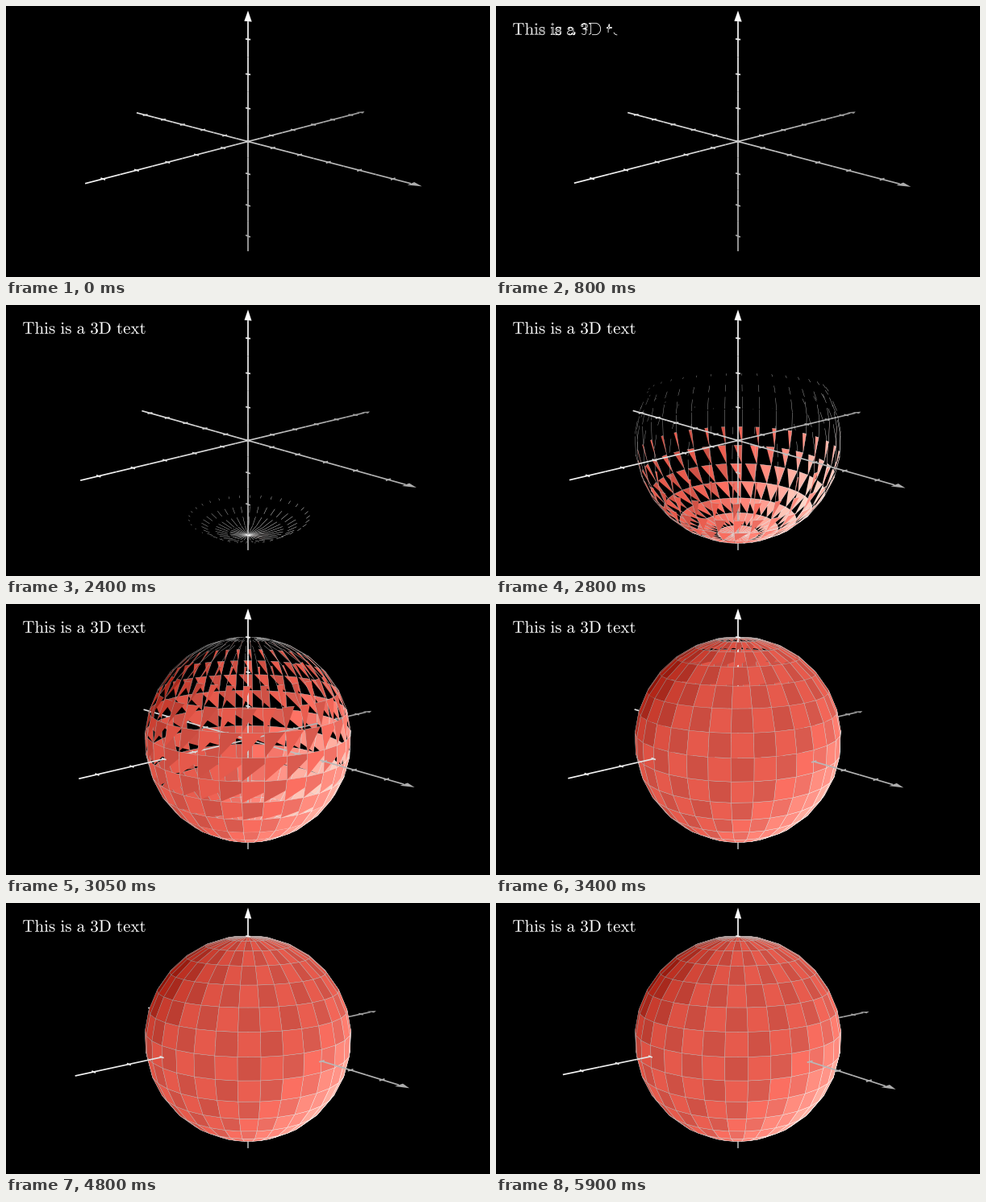
Recreate the animation shown at these times as a matplotlib script. Size 600x337 px, loop 6000 ms.

```python
import math

import matplotlib.pyplot as plt
import numpy as np
from matplotlib.animation import FuncAnimation
from matplotlib.collections import PolyCollection
from matplotlib.patches import PathPatch
from matplotlib.path import Path
from matplotlib.textpath import TextPath

W, H, DPI = 600, 337, 100
PX = 72 / DPI                      # points per pixel
UNIT = 42.17                       # pixels per scene unit
FOCAL = 20
PHI = math.radians(75)
THETA0 = math.radians(-45)
SPIN = 0.02                        # camera turn, radians per second
FPS = 15
SPIN_START = 6
WRITE_END, BUILD_START, BUILD_END = 30, 30, 60

RADIUS, ROWS, COLS = 3, 15, 32
CHECKER = np.array([[0xE6, 0x5A, 0x4C], [0xCF, 0x50, 0x44]]) / 255
GRID = np.full(3, 0xBB / 255)
LIGHT = np.array([-7, -9, 10])
FACE_OVERLAP = 2.0                 # build length in units of one face's drawing time
LETTER_LAG = 0.1

plt.rcParams["mathtext.fontset"] = "cm"


def smooth(t):
    def sigmoid(x):
        return 1 / (1 + math.exp(-x))
    low = sigmoid(-5)
    return min(max((sigmoid(10 * (t - 0.5)) - low) / (1 - 2 * low), 0), 1)


def double_smooth(t):
    return smooth(2 * t) / 2 if t < 0.5 else 0.5 + smooth(2 * t - 1) / 2


def soft_step(t):
    return t + 0.7 * (t * t * (3 - 2 * t) - t)


def project(points, theta):
    """Return screen positions and depth towards the camera."""
    x, y, z = np.moveaxis(np.asarray(points, float), -1, 0)
    side = -x * math.sin(theta) + y * math.cos(theta)
    back = -x * math.cos(theta) - y * math.sin(theta)
    up = back * math.cos(PHI) + z * math.sin(PHI)
    depth = -back * math.sin(PHI) + z * math.cos(PHI)
    scale = UNIT * FOCAL / (FOCAL - depth)
    xy = np.stack([W / 2 + side * scale, H / 2 - up * scale], axis=-1)
    return xy, depth


def cut(points, part):
    """First part (0 to 1) of a polyline, measured in vertices."""
    if part >= 1:
        return points
    pos = part * (len(points) - 1)
    n = int(pos)
    end = points[n] + (pos - n) * (points[n + 1] - points[n])
    return np.vstack([points[:n + 1], end])


def make_sphere():
    def at(u, v):
        return (RADIUS * math.cos(u) * math.cos(v),
                RADIUS * math.cos(u) * math.sin(v),
                RADIUS * math.sin(u))
    lat = np.linspace(-math.pi / 2, math.pi / 2, ROWS + 1)
    lon = np.linspace(0, 2 * math.pi, COLS + 1)
    faces, fills, edges = [], [], []
    for i in range(ROWS):
        for j in range(COLS):
            a, b, c, d = lat[i], lat[i + 1], lon[j], lon[j + 1]
            face = np.array([at(a, c), at(b, c), at(b, d), at(a, d), at(a, c)])
            middle = np.array(at((a + b) / 2, (c + d) / 2))
            sun = LIGHT - middle
            lit = -middle @ sun / RADIUS / np.linalg.norm(sun)
            glow = 0.5 * lit ** 3 * (1 if lit > 0 else 0.5)
            faces.append(face)
            fills.append(np.clip(CHECKER[(i + j) % 2] + glow, 0, 1))
            edges.append(np.clip(GRID + glow, 0, 1))
    return np.array(faces), fills, edges


def make_axes():
    """Line pieces, ticks and tips as (points, grey, is outside the sphere)."""
    ex, ey, ez = np.eye(3)
    lines, tips = [], []
    for way, side, end, first, last in ((ex, ey, 5.5, 0.88, 0.68),
                                        (ey, ex, 5.5, 0.97, 0.60),
                                        (ez, ex, 3.5, 0.66, 1.00)):
        def grey(s):
            return first + (last - first) * (s + end) / (2 * end)
        for s in np.arange(-end, end, 0.5):
            mid = s + 0.25
            lines.append(((s * way, (s + 0.5) * way), grey(mid), abs(mid) > RADIUS))
        for s in range(-int(end), int(end) + 1):
            mark = (s * way - 0.1 * side, s * way + 0.1 * side)
            lines.append((mark, grey(s), abs(s) >= RADIUS))
        base = end * way
        tips.append(((base - 0.15 * side, (end + 0.3) * way, base + 0.15 * side),
                     last, True))
    return lines, tips


def make_letters():
    """Outlines of the caption, one list of closed polygons per letter."""
    text = TextPath((0, 0), r"$\mathrm{This\ is\ a\ 3D\ text}$", size=210)
    polys = [p / 10 for p in Path(text.vertices, text.codes).to_polygons()]
    polys.sort(key=lambda p: p[:, 0].min())
    corner = np.array([polys[0][:, 0].min(), max(p[:, 1].max() for p in polys)])
    letters, right = [], -1e9
    for p in polys:
        p = (p - corner) * (1, -1) + 21.1
        if (p[:, 0].min() + p[:, 0].max()) / 2 < right:
            letters[-1].append(p)
        else:
            letters.append([p])
            right = -1e9
        right = max(right, p[:, 0].max())
    return letters


def outline(polys, part):
    left = part * sum(len(p) for p in polys)
    pieces = []
    for p in polys:
        if left <= 0:
            break
        pieces.append(Path(cut(p, min(left / len(p), 1))))
        left -= len(p)
    return Path.make_compound_path(*pieces)


faces, fills, edges = make_sphere()
lines, tips = make_axes()
letters = make_letters()

fig = plt.figure(figsize=(W / DPI, H / DPI), dpi=DPI, facecolor="black")
ax = fig.add_axes([0, 0, 1, 1])
ax.set_xlim(0, W)
ax.set_ylim(H, 0)
ax.axis("off")

scene = PolyCollection([], closed=False)
scene.set_snap(False)
ax.add_collection(scene, autolim=False)
glyphs = [ax.add_patch(PathPatch(outline(p, 1), snap=False)) for p in letters]


def draw_scene(step):
    theta = THETA0 + SPIN * max(0, step - SPIN_START) / FPS
    items = []                     # depth, points, fill, edge, width
    for parts, width in ((lines, 1.7), (tips, 0)):
        xy, depth = project([p[0] for p in parts], theta)
        for (_, grey, outside), pts, z in zip(parts, xy, depth.mean(axis=1)):
            rgba = (grey, grey, grey, 1)
            fill = (0, 0, 0, 0) if width else rgba
            items.append((z * 10 if outside else z, pts, fill, rgba, width))

    t = min(max((step - BUILD_START) / (BUILD_END - BUILD_START), 0), 1)
    if t > 0:
        reach = soft_step(t) * FACE_OVERLAP
        xy, depth = project(faces, theta)
        depth = depth[:, :4].mean(axis=1)
        delay = np.linspace(0, FACE_OVERLAP - 1, len(faces))
        for k in range(len(faces)):
            part = reach - delay[k]
            if part > 0:
                items.append((depth[k], cut(xy[k], part), (*fills[k], 1),
                              (*edges[k], 1), 0.4))

    items.sort(key=lambda item: item[0])
    _, verts, face, edge, width = zip(*items)
    scene.set_verts(verts, closed=False)
    scene.set_facecolor(face)
    scene.set_edgecolor(edge)
    scene.set_linewidth([w * PX for w in width])


def draw_text(step):
    total = 1 + LETTER_LAG * (len(letters) - 1)
    reach = double_smooth(min(step / WRITE_END, 1)) * total
    for k, (glyph, polys) in enumerate(zip(glyphs, letters)):
        part = min(max(reach - k * LETTER_LAG, 0), 1)
        glyph.set_visible(part > 0)
        if part == 0:
            continue
        fill = max(0, 2 * part - 1)
        glyph.set_path(outline(polys, min(2 * part, 1)))
        glyph.set_facecolor((1, 1, 1, fill))
        glyph.set_edgecolor((1, 1, 1, 1 if fill < 1 else 0))
        glyph.set_linewidth(0.84 * (1 - fill) * PX)


def update(n):
    step = (3 * n + 2) // 4        # 15 pictures a second on a 50 ms clock
    draw_scene(step)
    draw_text(step)
    return [scene, *glyphs]


anim = FuncAnimation(fig, update, frames=120, interval=50, repeat=True,
                     repeat_delay=0, blit=False)
plt.show()
```
